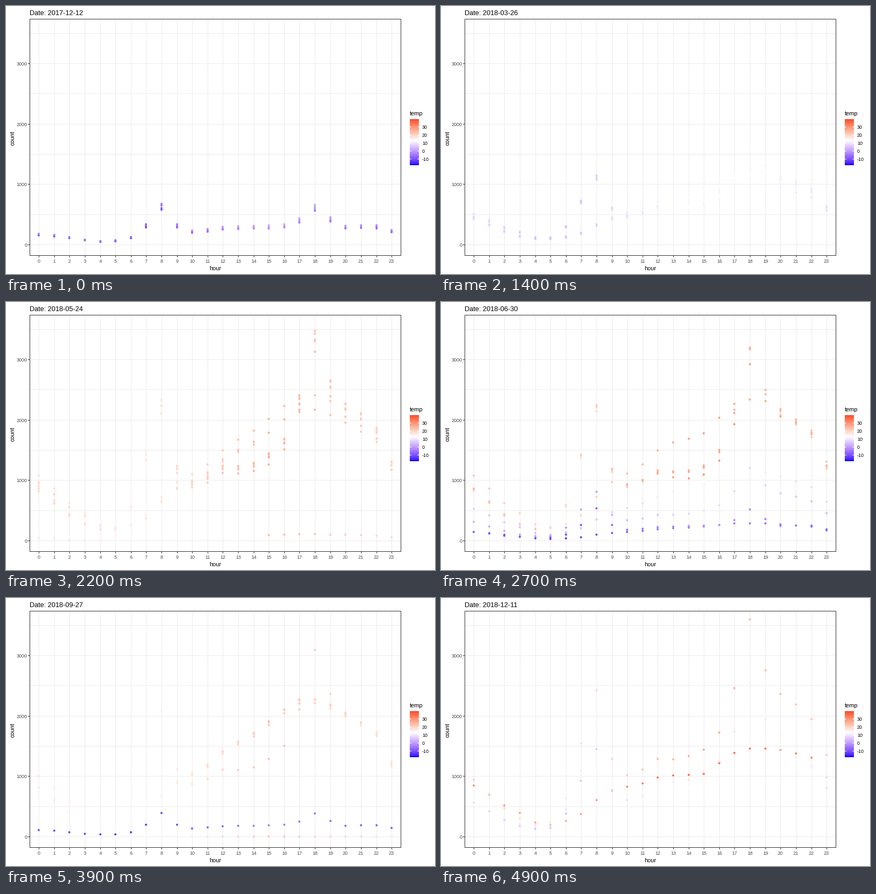
A matplotlib script that plays this animation: 800 by 500 pixels, repeating every 5 s.

```python
import random

import numpy as np
import matplotlib.pyplot as plt
from matplotlib.animation import FuncAnimation
from matplotlib.patches import Rectangle

plt.rcParams["font.family"] = "Liberation Sans"
PX = 0.72  # points per pixel at 100 dpi
FRAMES, INTERVAL = 50, 100
START, SPAN = np.datetime64("2017-12-12"), 364
HOURS = np.arange(24)
MID_TEMP, MIN_TEMP, MAX_TEMP = 12.88, -17.8, 39.4

# Typical hourly demand on working days, days off and frosty working days.
WORK = np.array([900, 680, 460, 300, 210, 240, 660, 1560, 2390, 1240, 950, 1020,
                 1160, 1130, 1150, 1270, 1500, 2130, 3160, 2450, 2130, 2000, 1800, 1270])
REST = np.array([1050, 850, 620, 460, 270, 210, 290, 430, 720, 950, 1060, 1180,
                 1370, 1500, 1600, 1740, 1950, 2130, 2160, 2100, 2000, 1870, 1720, 1250])
FROST = np.array([160, 145, 110, 75, 50, 60, 110, 300, 610, 300, 205, 230,
                  260, 270, 280, 285, 300, 390, 590, 405, 280, 290, 285, 215]) / 0.19

# Key points over the year: day, mean temperature, demand level.
CLIMATE = np.array([
    (0, -4, .16), (9, -9, .13), (25, -9, .14), (43, -4, .185), (84, 10, .48),
    (98, 8, .55), (128, 16, .85), (145, 21, .99), (160, 23.5, 1.03), (190, 25, .95),
    (205, 30, .95), (214, 33, .95), (224, 31.5, .97), (240, 27, .95), (253, 22, 1),
    (270, 18.5, .96), (285, 12.5, .86), (306, 9, .82), (316, 9.5, .65), (334, 3, .45),
    (345, -8, .18), (348, -2.5, .205), (365, -4, .16)]).T

HOLIDAYS = {"01-01", "02-15", "02-16", "03-01", "05-22", "06-06", "08-15", "09-24",
            "09-25", "09-26", "10-03", "12-25"}
CLOSED = {"04-11", "09-18", "09-19", "09-28", "09-30", "10-02", "10-04", "10-09",
          "11-03", "11-06", "11-09"}
RAIN = {"04-05": (6, 24), "04-08": (16, 24), "05-16": (8, 24), "05-17": (0, 24),
        "05-22": (15, 24), "05-23": (0, 7), "06-26": (8, 24), "07-01": (0, 24),
        "07-02": (0, 11), "08-28": (15, 24), "10-05": (0, 24), "11-08": (0, 24)}


def temp_colors(temps):
    """Blue-white-red scale, blended in Lab space."""
    t = (np.asarray(temps, float) - MID_TEMP) / (MID_TEMP - MIN_TEMP)
    white, blue, red = np.array([[100, 0, 0], [32.3, 79.2, -107.9], [53.2, 80.1, 67.2]])
    end = np.where(t[:, None] < 0, blue, red)
    L, a, b = (white + np.clip(abs(t), 0, 1)[:, None] * (end - white)).T
    fy = (L + 16) / 116
    f = np.array([fy + a / 500, fy, fy - b / 200])
    xyz = np.where(f > 6 / 29, f**3, 3 * (6 / 29) ** 2 * (f - 4 / 29))
    xyz *= np.array([[0.9505], [1], [1.089]])
    rgb = np.array([[3.2406, -1.5372, -0.4986],
                    [-0.9689, 1.8758, 0.0415],
                    [0.0557, -0.2040, 1.0570]]) @ xyz
    rgb = np.clip(rgb, 0, 1)
    return np.where(rgb > 0.0031308, 1.055 * rgb ** (1 / 2.4) - 0.055, 12.92 * rgb).T


def recorded_date(shown):
    """Day and month are swapped wherever both readings are valid."""
    year, month, day = str(shown).split("-")
    if int(day) > 12 or shown == START:
        return shown
    return None if day == "12" else np.datetime64(f"{year}-{day}-{month}")


def day_record(date):
    """Hourly counts and temperatures of one day."""
    key, number = str(date)[5:], int(date.astype(int))
    rng = random.Random(number)
    day_of_year = (date - date.astype("datetime64[Y]")).astype(int)
    mean = np.interp(day_of_year, CLIMATE[0], CLIMATE[1]) + rng.gauss(0, 0.8)
    level = np.interp(day_of_year, CLIMATE[0], CLIMATE[2]) * rng.gauss(1, 0.05)
    temps = mean - 5 + 10 * np.interp(HOURS, [0, 6, 15, 23], [0.35, 0, 1, 0.45])

    day_off = (number + 3) % 7 > 4 or key in HOLIDAYS
    base = REST if day_off else FROST if mean < 3 else WORK
    comfort = 1 + 0.02 * (temps - mean) * (mean > 3)
    comfort *= np.interp(temps, [26, 38], [1, 0.48])
    counts = base * level * comfort
    first, last = RAIN.get(key, (0, 0))
    counts[first:last] *= 0.05
    return counts * (key not in CLOSED), temps


def hour_x(hour):
    return np.round(61.1 + 28.61 * hour)


def count_y(count):
    return np.floor(445.5 - 0.11267 * count)


weeks = [[] for _ in range(FRAMES)]
for offset in range(SPAN + 1):
    date = recorded_date(START + offset)
    if date is not None:
        weeks[round(1 + offset * (FRAMES - 1) / SPAN) - 1].append(date)

fig = plt.figure(figsize=(8, 5), dpi=100, facecolor="white")
ax = fig.add_axes([0, 0, 1, 1])


def line(x, y, color, z=1):
    ax.plot(x, y, color=color, lw=PX, snap=False, solid_capstyle="butt", zorder=z)


def label(x, y, text, size, ha="left", color="black"):
    return ax.text(x, y + 0.36 * size, text, fontsize=size * PX, ha=ha,
                   va="baseline", color=color)


for hour in HOURS:
    x = hour_x(hour)
    line([x + 0.5] * 2, [25, 465], "#EBEBEB")
    line([x + 0.5] * 2, [466, 469], "#333333")
    label(x, 475.5, str(hour), 9, "center", "#4D4D4D")
for count in range(0, 4000, 500):
    y = count_y(count) + 0.5
    line([45, 736], [y, y], "#EBEBEB")
    if count % 1000 == 0:
        line([41, 44], [y, y], "#333333")
        label(39.5, y + 0.5, str(count), 9, "right", "#4D4D4D")
ax.add_patch(Rectangle((44.5, 24.5), 692, 441, fill=False, ec="#333333", lw=PX,
                       snap=False, zorder=4))
label(390, 489.5, "hour", 11, "center")
ax.text(12, 246, "count", fontsize=11 * PX, rotation=90, ha="center", va="center")

bar = temp_colors(np.linspace(MAX_TEMP, MIN_TEMP, 86))[:, None, :]
ax.imshow(bar, extent=(753, 770, 297, 211), aspect="auto", interpolation="nearest")
label(753, 200, "temp", 11)
for temp in (-10, 0, 10, 20, 30):
    y = 270.5 - 1.5 * temp
    line([753, 756], [y, y], "white", 3)
    line([767, 770], [y, y], "white", 3)
    label(776, y, str(temp), 9)

title = label(43.5, 12.3, "", 12.7)
dots = ax.scatter([], [], s=(4 * PX) ** 2, linewidths=0, zorder=3)
ax.set(xlim=(0, 800), ylim=(500, 0))
ax.axis("off")


def update(frame):
    title.set_text(f"Date: {START + SPAN * frame // (FRAMES - 1)}")
    records = [day_record(date) for date in sorted(weeks[frame])]
    counts = np.concatenate([record[0] for record in records])
    temps = np.concatenate([record[1] for record in records])
    xs = np.tile(hour_x(HOURS), len(records))
    dots.set_offsets(np.column_stack([xs, count_y(counts)]))
    dots.set_facecolors(temp_colors(temps))
    return dots, title


animation = FuncAnimation(fig, update, frames=FRAMES, interval=INTERVAL, repeat=True)
plt.show()
```
